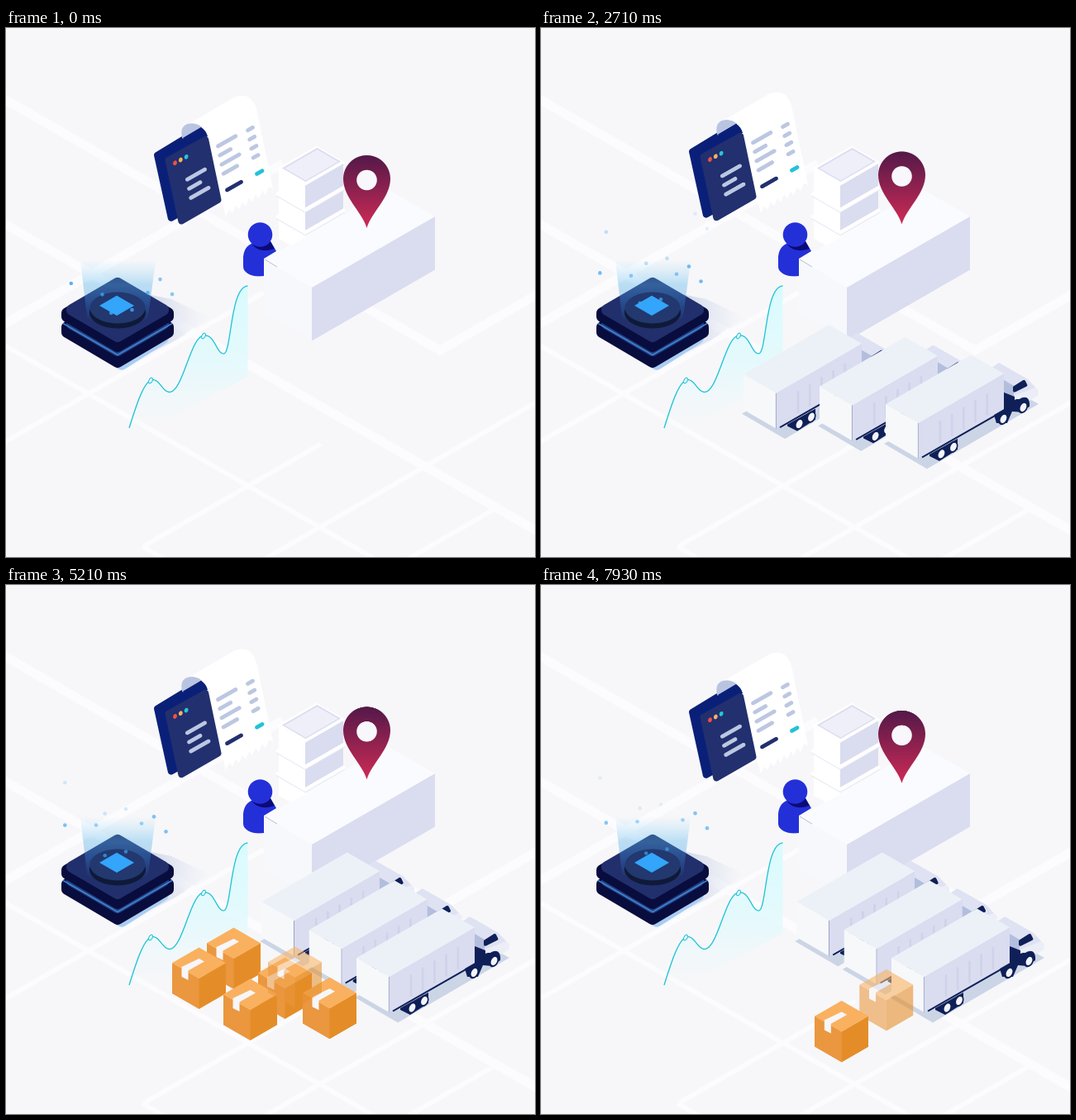
These frames come from a looping animation (640 px wide and 640 px high, 8000 ms). An HTML page with a canvas:

```html
<!DOCTYPE html>
<html lang="en">
<head>
<meta charset="utf-8">
<title>Isometric logistics scene</title>
<style>
html, body { margin: 0; width: 100%; height: 100%; overflow: hidden; background: #f7f7f9; }
canvas { display: block; width: 100vw; height: 100vh; }
</style>
</head>
<body>
<canvas id="stage" width="640" height="640"></canvas>
<script>
const LOOP = 8000;
const ISO = 0.577;
const NAVY = '#0f2058', INDIGO = '#22306f', SIDE = '#dadcf0', WHITE = '#ffffff';
const ctx = document.getElementById('stage').getContext('2d');

const clamp = v => Math.max(0, Math.min(1, v));
const ease = v => (1 - Math.cos(Math.PI * clamp(v))) / 2;

function poly(c, color, ...p) {
  c.fillStyle = color;
  c.beginPath();
  for (let i = 0; i < p.length; i += 2) c.lineTo(p[i], p[i + 1]);
  c.closePath();
  c.fill();
}
// Polygon with rounded corners
function softPoly(c, color, r, ...p) {
  const n = p.length;
  c.fillStyle = color;
  c.beginPath();
  c.moveTo((p[0] + p[n - 2]) / 2, (p[1] + p[n - 1]) / 2);
  for (let i = 0; i < n; i += 2) c.arcTo(p[i], p[i + 1], p[(i + 2) % n], p[(i + 3) % n], r);
  c.closePath();
  c.fill();
}
function line(c, color, width, ...p) {
  c.strokeStyle = color;
  c.lineWidth = width;
  c.beginPath();
  for (let i = 0; i < p.length; i += 2) c.lineTo(p[i], p[i + 1]);
  c.stroke();
}
function shape(c, color, d) {
  c.fillStyle = color;
  c.fill(new Path2D(d));
}
function oval(c, color, x, y, rx, ry = rx, turn = 0) {
  c.fillStyle = color;
  c.beginPath();
  c.ellipse(x, y, rx, ry, turn, 0, 7);
  c.fill();
}
function fade(c, x0, y0, x1, y1, ...stops) {
  const g = c.createLinearGradient(x0, y0, x1, y1);
  for (let i = 0; i < stops.length; i += 2) g.addColorStop(stops[i], stops[i + 1]);
  return g;
}
// Isometric cuboid: (x, y) is the near top corner; a, b are the spans to the left and right
function block(c, x, y, a, b, h, top, left, right) {
  const la = y - a * ISO, rb = y - b * ISO;
  poly(c, left, x - a, la, x, y, x, y + h, x - a, la + h);
  poly(c, right, x, y, x + b, rb, x + b, rb + h, x, y + h);
  poly(c, top, x, y, x + b, rb, x + b - a, rb - a * ISO, x - a, la);
}
// V-shaped edge around the near corner of a cuboid
function rim(c, color, width, x, y, a, b) {
  line(c, color, width, x - a, y - a * ISO, x, y, x + b, y - b * ISO);
}
// Pre-rendered picture, origin at (ox, oy), double resolution
function sprite(w, h, ox, oy, paint) {
  const img = document.createElement('canvas');
  img.width = w * 2;
  img.height = h * 2;
  const c = img.getContext('2d');
  c.scale(2, 2);
  c.translate(-ox, -oy);
  paint(c);
  return (x, y, alpha) => {
    if (alpha <= 0) return;
    ctx.globalAlpha = Math.min(1, alpha);
    ctx.drawImage(img, x + ox, y + oy, w, h);
    ctx.globalAlpha = 1;
  };
}

function roads(c) {
  const road = (width, slope, y, x0 = -10, x1 = 650) =>
    line(c, '#fcfcfe', width, x0, y + slope * x0, x1, y + slope * x1);
  road(11, ISO, 87, -10, 527);
  road(11, -ISO, 693, 521);
  road(11, ISO, 238);
  road(11, -ISO, 357, -10, 335);
  road(6, -ISO, 500, -10, 312);
  road(6, ISO, 385);
  road(6, -ISO, 723, 167, 381);
  road(6, ISO, 532, 165, 200);
  road(6, -ISO, 823, 300);
  road(6, -ISO, 923, 480, 590);
}

function building(c) {
  block(c, 370, 314, 58, 149, 64.5, '#fafbfe', '#f7f8fb', SIDE);
  line(c, '#b9bdd2', 0.8, 313, 280, 328, 289);
}

function shelves(c) {
  block(c, 362, 215, 32, 46, 32, WHITE, WHITE, SIDE);
  poly(c, WHITE, 330, 228, 362, 247, 362, 253, 345, 263, 330, 255);
  block(c, 362, 190, 32, 46, 28, WHITE, WHITE, SIDE);
  for (const y of [220, 247.5]) {
    rim(c, '#e6e8f4', 1.2, 362, y + 3, 35, 48);
    rim(c, WHITE, 4.5, 362, y, 35, 48);
  }
  const lid = (y, a, b, color) => block(c, 362.5, y, a, b, 0, color, color, color);
  lid(190.5, 35, 48, WHITE);
  lid(186, 28.5, 42.5, SIDE);
  lid(184.5, 25.5, 39.5, '#eeeff8');
}

function person(c) {
  shape(c, '#2330d8', 'M287 277Q288 264 299 260L320 258L327 270L312 279V300Q296 302 289 294Q287 292 287 288Z');
  shape(c, '#0b0b78', 'M298 262Q307 273 325 267L320 258Z');
  oval(c, '#2330d8', 307.5, 250, 14.8);
}

function chart(c) {
  const curve = 'M149 484C158 455 167 427 177 425.5C186 425 189 440 198 440.5C214 440 223 374 239 372' +
    'C253 370 254 394 263.5 394C273 393 271 313 292.5 312';
  shape(c, fade(c, 0, 312, 0, 492, 0, '#d9fcff', 0.5, 'rgba(225,250,253,.85)', 1, 'rgba(240,248,251,0)'),
    curve + 'V422L149 498Z');
  c.strokeStyle = '#1cc3d6';
  c.lineWidth = 1.3;
  c.stroke(new Path2D(curve));
  for (const [x, y] of [[175, 426.5], [239, 372.5]]) {
    oval(c, '#f2fdff', x, y, 2, 3.6, 0.5);
    c.lineWidth = 1;
    c.stroke();
  }
}

function platform(c) {
  const slab = (y, depth, top) => {
    const h = 68 * 0.59;
    softPoly(c, '#080d3e', 7, 67, y + depth, 67, y, 135, y - h, 203, y, 203, y + depth, 135, y + depth + h);
    softPoly(c, top, 7, 66, y, 135, y - h, 204, y, 135, y + h);
  };
  poly(c, fade(c, 170, 0, 245, 0, 0, '#cdd6ea', 1, 'rgba(225,229,242,0)'), 170, 322, 200, 328, 246, 350, 205, 378, 150, 405);
  softPoly(c, '#a9cdf3', 8, 75, 376, 140, 340, 205, 374, 140, 415);
  slab(358, 14, '#23407f');
  rim(c, '#4087da', 1.5, 135, 395.5, 66, 66);
  slab(341, 12, '#212f6c');
  shape(c, fade(c, 0, 280, 0, 356, 0, 'rgba(120,205,245,0)', 0.4, 'rgba(85,180,235,.38)', 0.65, 'rgba(60,150,225,.32)', 1, 'rgba(60,150,225,0)'),
    'M90 281H181L172 350Q135 374 98 350Z');
  oval(c, '#0e1a38', 135, 344, 34, 19.5);
  oval(c, '#22386f', 135, 338.5, 33.5, 19);
  block(c, 134, 348, 21, 21, 0, '#33a5fa', WHITE, WHITE);
}

function receipt(c) {
  const paleBlue = '#bcc7e2', deep = '#0a2078';
  softPoly(c, deep, 4, 178.5, 152, 236, 117, 256, 203, 197, 236);
  c.fillStyle = WHITE;
  c.beginPath();
  c.moveTo(221, 116);
  c.lineTo(276, 84);
  c.quadraticCurveTo(296, 76, 303, 98);
  c.lineTo(323, 194);
  for (let i = 0; i < 7; i++) {
    c.lineTo(318 - i * 8, 192 + i * 4.6);
    c.lineTo(314 - i * 8, 202 + i * 4.4);
  }
  c.lineTo(261, 210);
  c.lineTo(244, 131);
  c.quadraticCurveTo(237, 115, 221, 116);
  c.fill();
  shape(c, '#b9c4e1', 'M213 133Q210 119 220 116Q230 114 237 120L214 134Z');
  shape(c, deep, 'M214 133L236 120Q242 124 244 131L225 142Z');
  softPoly(c, INDIGO, 4, 192, 158, 244, 129, 261, 210, 209.5, 239.8);

  ['#ee523f', '#f4b45e', '#2ac4d8'].forEach((color, i) =>
    oval(c, color, 204.5 + i * 6.8, 163.3 - i * 3.7, 2.3, 3, 0.4));
  c.lineCap = 'round';
  const bar = (color, x, y, w) => line(c, color, 4.8, x, y, x + w, y - w * 0.57);
  const column = (x, y, widths) => widths.forEach((w, i) => bar(paleBlue, x + i * 2.2, y + i * 11.1, w));
  column(219.3, 183.3, [21.3, 13.5, 21.3]);
  column(256.5, 143, [21.3, 13, 21.3, 16.5]);
  column(292.5, 123.8, [6, 6, 6, 6]);
  bar(INDIGO, 267.5, 196, 17);
  bar('#22c3d6', 303.5, 176.5, 6.5);
}

function pin(c) {
  shape(c, fade(c, 0, 154, 0, 242, 0, '#531949', 1, '#cf2b56'),
    'M436.5 242C431 223 408 205 408 182.5A28.5 28.5 0 0 1 465 182.5C465 205 442 223 436.5 242Z');
  oval(c, '#f8f8fc', 436.5, 184, 12.3);
}

function truck(c) {
  const wheel = (x, y) => {
    oval(c, NAVY, x, y, 5.6, 7.6, 0.45);
    oval(c, '#f4f5fa', x + 0.5, y, 3.5, 5.4, 0.45);
  };
  poly(c, '#ccd5e6', 422, 499, 474, 529.5, 609, 451, 560, 424);
  // cab
  softPoly(c, '#dfe2f2', 3, 551, 408, 561, 401, 596, 421, 609, 435, 608, 441, 585, 453, 567, 440);
  poly(c, '#b3bedd', 567, 422, 579, 429, 579, 441, 567, 438);
  softPoly(c, NAVY, 2, 578, 430, 592, 421, 596, 429, 578, 438);
  shape(c, NAVY, 'M567 437L580 442V446L592 442Q599 444 598 454L588 461L577 460L571 474H558L555 464Z');
  shape(c, '#eceef7', 'M580 441L605 431L609 435L608 441L599 447Q594 440 586 445L580 445Z');
  // undercarriage
  line(c, NAVY, 2, 468, 515.5, 567, 459);
  poly(c, NAVY, 477, 512, 511, 493, 511, 506, 489, 520, 477, 514);
  wheel(491, 511.5);
  wheel(505.5, 503);
  wheel(566, 469);
  wheel(590, 455);
  // trailer
  block(c, 463.5, 474, 39.5, 103.5, 43, '#ecf1f8', '#f7f8fa', SIDE);
  line(c, '#9aa3c4', 0.8, 463.3, 474, 463.3, 517);
  for (let x = 490; x < 550; x += 14.2) {
    const y = 471 - (x - 490) * ISO;
    line(c, '#d0d2ea', 2.6, x, y, x, y + 27);
  }
}

function box(c) {
  block(c, 0, 38, 32.5, 32.5, 37, '#f9b160', '#ea973f', '#e48d28');
  poly(c, '#f7f6f8', -21, 24, 0, 14, 6.5, 17.5, -13, 28.5, -13, 40, -21, 36);
}

const drawScene = sprite(640, 640, 0, 0, c => {
  c.fillStyle = '#f7f7f9';
  c.fillRect(0, 0, 640, 640);
  [roads, building, shelves, person, platform, chart].forEach(paint => paint(c));
});
const drawReceipt = sprite(160, 180, 170, 70, receipt);
const drawPin = sprite(64, 96, 405, 150, pin);
const drawTruck = sprite(200, 150, 416, 386, truck);
const drawBox = sprite(68, 78, -34, -1, box);

// Sparks rise in waves; each column has x, lowest y, lifetime and delay
const waves = [{ start: -1100, shift: 7.5 }, { start: 950, shift: 0 }, { start: 3200, shift: 0 }, { start: 5800, shift: 7.5 }];
const columns = [
  [71.3, 318, 5300, 0], [109, 340, 3700, 0], [119.7, 353, 5500, 0], [145, 350, 5300, 0],
  [164, 338, 3700, 0], [179, 308, 3700, 600], [193.5, 326, 3700, 600]
];
function drawSparks(t) {
  for (const { start, shift } of waves) {
    for (const [x, low, life, delay] of columns) {
      const p = (t - start - delay) / life;
      if (p <= 0 || p >= 1) continue;
      ctx.globalAlpha = 0.9 * Math.min(1, p / 0.2, (1 - p) * 1.2);
      oval(ctx, '#3fa5f2', x + shift, low - 87 * ease(p), 2.3);
    }
  }
  ctx.globalAlpha = 1;
}

function drawTrucks(t) {
  for (let i = 2; i >= 0; i--) {
    const age = t - 1230 - i * 205;
    const back = 225 * (1 - ease(age / 1670));
    drawTruck(-57.4 * i - back, -34 * i + back * 0.555, age / 900);
  }
}

// Six boxes on a 3 by 2 grid drop in one by one, then slide towards the trucks
function drawBoxes(t) {
  for (let i = 0; i < 6; i++) {
    const col = i >> 1, row = i % 2;
    const age = t - 2935 - i * 400;
    const gone = Math.max(0, t - 5984 - i * 333);
    const dx = 30 * Math.sin(Math.PI / 2 * clamp(gone / 900));
    const lift = 100 * (1 - ease(age / 870));
    const x = 275.5 + 66 * col - 4 * col * col - 42 * row;
    const y = 414 + 36 * col + (24 + 2 * col) * row;
    drawBox(x + dx, y - lift - dx * 0.82, Math.min(age / 500, (680 - gone) / 110));
  }
}

const bob = (t, low, period) => ease(2 * Math.abs(((t - low) / period + 0.5) % 1 - 0.5));

function render(now) {
  const t = now % LOOP;
  const settle = clamp(1 - t / 1000) ** 2;
  drawScene(0, 0, 1);
  drawSparks(t);
  drawReceipt(0, -6 * bob(t, 100, 3850), 1);
  drawPin(0, 1.5 * (settle - 1) - 5.8 * bob(t, -100, 3800), 1);
  drawTrucks(t);
  drawBoxes(t);
  requestAnimationFrame(render);
}
requestAnimationFrame(render);
</script>
</body>
</html>
```
